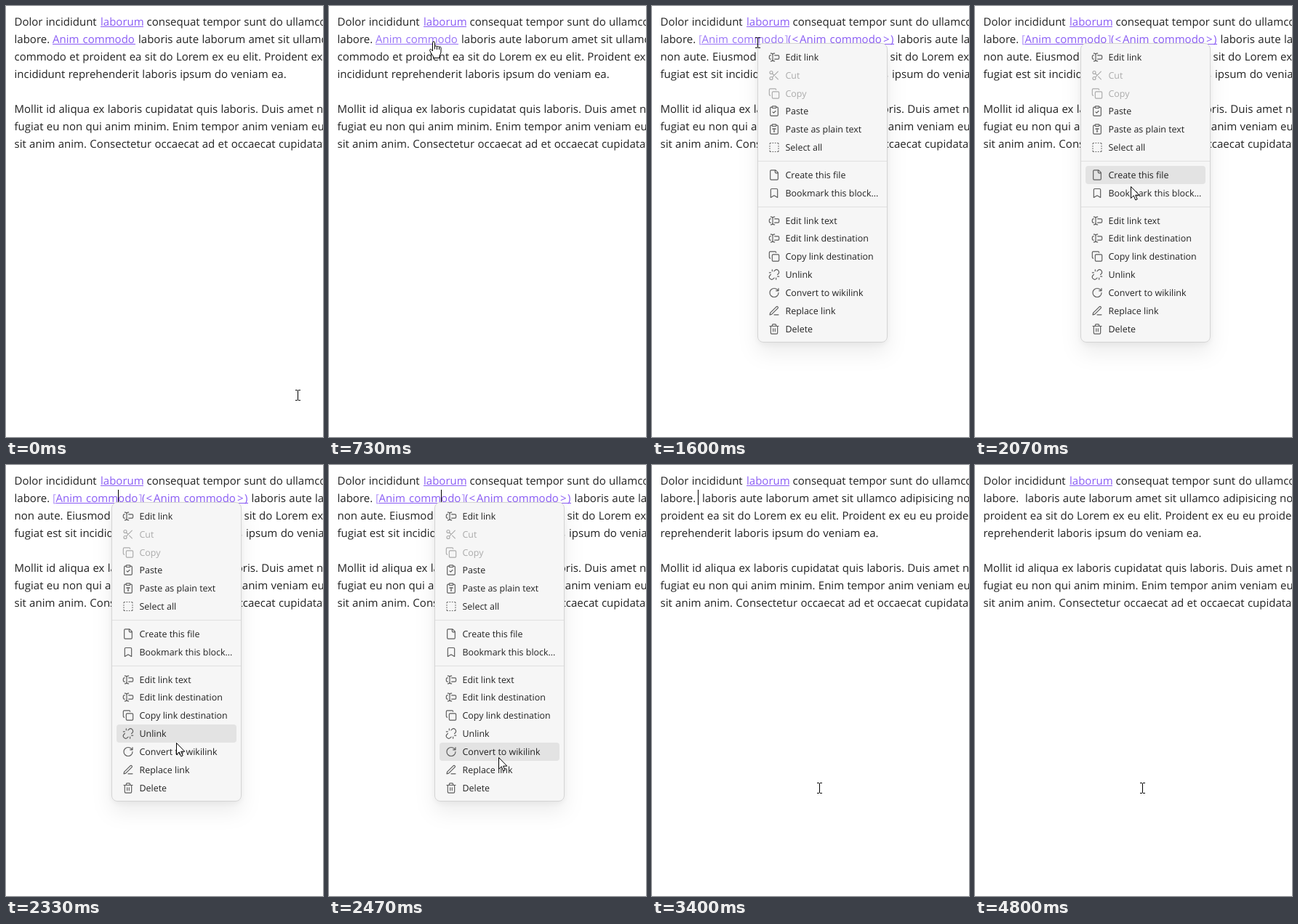
Recreate the animation shown at these times as an HTML page. Size 436x593 px, loop 5.14 s.

```html
<!DOCTYPE html>
<html lang="en">
<head>
<meta charset="utf-8">
<title>Link context menu</title>
<style>
  html, body { margin: 0; width: 100%; height: 100%; overflow: hidden; background: #fff; }
  svg { display: block; }
  text { font: 15px "Open Sans", "Noto Sans", sans-serif; word-spacing: .45px; fill: #222; white-space: pre; text-rendering: geometricPrecision; }
  .link, .link text { fill: #8a5cf5; }
  .link.hover, .link.hover text { fill: #9873f7; }
  text.mark { fill: #8a5cf5; opacity: .65; }
  #panel { fill: #f6f6f6; stroke: #d4d4d4; filter: drop-shadow(0 3px 4px rgba(0,0,0,.05)) drop-shadow(0 14px 14px rgba(0,0,0,.07)); }
  #menu text { font-size: 12.45px; word-spacing: 0; }
  #menu .off text { fill: #ababab; }
  .icon { fill: none; stroke: #5c5c5c; stroke-width: 1.75; stroke-linecap: round; stroke-linejoin: round; }
  .off .icon { stroke: #ababab; }
  .pointer { fill: #fff; stroke: #000; stroke-linejoin: round; }
</style>
</head>
<body>
<svg id="stage" width="436" height="593" viewBox="0 0 436 593">
  <g id="shared"></g>
  <g id="rendered"></g>
  <g id="expanded"></g>
  <g id="deleted"></g>
  <rect id="caret" y="34" width="1" height="21"/>
  <g id="menu">
    <rect id="panel" x="145.5" y="51.5" width="178" height="411" rx="7.5"/>
    <path d="M146 213.5h177M146 276.5h177" stroke="#e0e0e0"/>
    <rect id="highlight" x="152" width="165" height="25" rx="4" fill="#e3e3e3"/>
  </g>
  <path id="ibeam" fill="none" stroke="#000" d="M-3-6.5h3M1-6.5h3M.5-6V7M-3 7.5h3M1 7.5h3"/>
  <path id="arrow" class="pointer" d="M.5.5v16l3.7-3.6 2.6 6 2.4-1-2.6-5.7h5.2z"/>
  <path id="hand" class="pointer" d="M-2.5 12V.5a1.5 1.5 0 0 1 3 0V6c0-1.5 3-1.5 3 .3 0-1.5 3-1.2 3 .5 0-1.3 2.5-1 2.5.8V13c0 3-2 4-2 6.5v2h-8.5V20C-2 18-5 15-6 12c-1.3-2.5 1-3.5 2.3-1.5zM.5 5v4.5M3.5 6v4M6.5 7v3"/>
</svg>
<script>
const LOOP = 5140, STEP = 1000 / 15, LEFT = 11.5;
const $ = id => document.getElementById(id);

function add(parent, tag, attrs, content = '') {
  const node = document.createElementNS('http://www.w3.org/2000/svg', tag);
  for (const key in attrs) node.setAttribute(key, attrs[key]);
  node.textContent = content;
  return parent.appendChild(node);
}

// Text on a line of the 24px baseline grid
const write = (parent, line, x, content, cls = '') =>
  add(parent, 'text', { x, y: 27 + 24 * line, class: cls }, content);

function link(parent, line, x, width, pieces) {
  const group = add(parent, 'g', { class: 'link' });
  for (const [px, content] of pieces) write(group, line, px, content);
  add(group, 'rect', { x, y: 28 + 24 * line, width, height: 1 });
  return group;
}

const shared = $('shared');
write(shared, 0, LEFT, 'Dolor incididunt ');
link(shared, 0, 130, 59, [[130, 'laborum']]);
write(shared, 0, 193.5, 'consequat tempor sunt do ullamco');
write(shared, 1, LEFT, 'labore.');
write(shared, 5, LEFT, 'Mollit id aliqua ex laboris cupidatat quis laboris. Duis amet non');
write(shared, 6, LEFT, 'fugiat eu non qui anim minim. Enim tempor anim veniam eu');
write(shared, 7, LEFT, 'sit anim anim. Consectetur occaecat ad et occaecat cupidatat');

const rendered = $('rendered');
const plainLink = link(rendered, 1, 64, 114, [[64, 'Anim'], [105.5, 'commodo']]);
write(rendered, 1, 182, 'laboris aute laborum amet sit ullamco');
write(rendered, 2, LEFT, 'commodo et proident ea sit do Lorem ex eu elit. Proident ex');
write(rendered, 3, LEFT, 'incididunt reprehenderit laboris ipsum do veniam ea.');

const expanded = $('expanded');
write(expanded, 1, 64, '[', 'mark');
const sourceLink = link(expanded, 1, 68.5, 114, [[68.5, 'Anim'], [110, 'commodo']]);
write(expanded, 1, 182.5, ']', 'mark');
link(expanded, 1, 187, 146, [[187, '('], [192.5, '<'], [203, 'Anim'], [244.5, 'commodo'], [318, '>'], [328, ')']]);
write(expanded, 1, 337.5, 'laboris aute laborum');
write(expanded, 2, LEFT, 'non aute. Eiusmod commodo et proident ea');
write(expanded, 2, 327.5, 'sit do Lorem ex eu');
write(expanded, 3, LEFT, 'fugiat est sit incididunt reprehenderit laboris');
write(expanded, 3, 330, 'ipsum do veniam ea.');

const deleted = $('deleted');
write(deleted, 1, 69, 'laboris aute laborum amet sit ullamco adipisicing non');
write(deleted, 2, LEFT, 'proident ea sit do Lorem ex eu elit. Proident ex eu eu proident');
write(deleted, 3, LEFT, 'reprehenderit laboris ipsum do veniam ea.');

const clipboard = 'M9 2h6a1 1 0 0 1 1 1v2a1 1 0 0 1-1 1H9a1 1 0 0 1-1-1V3a1 1 0 0 1 1-1zM16 4h2a2 2 0 0 1 2 2v14a2 2 0 0 1-2 2H6a2 2 0 0 1-2-2V6a2 2 0 0 1 2-2h2';
const icons = {
  edit: 'M5 4h1a3 3 0 0 1 3 3 3 3 0 0 1 3-3h1M13 20h-1a3 3 0 0 1-3-3 3 3 0 0 1-3 3H5M5 16H4a2 2 0 0 1-2-2v-4a2 2 0 0 1 2-2h1M13 8h7a2 2 0 0 1 2 2v4a2 2 0 0 1-2 2h-7M9 7v10',
  cut: 'M9 6a3 3 0 1 1-6 0 3 3 0 0 1 6 0M9 18a3 3 0 1 1-6 0 3 3 0 0 1 6 0M20 4 8.12 15.88M14.47 14.48 20 20M8.12 8.12 12 12',
  copy: 'M10 8h10a2 2 0 0 1 2 2v10a2 2 0 0 1-2 2H10a2 2 0 0 1-2-2V10a2 2 0 0 1 2-2zM4 16a2 2 0 0 1-2-2V4a2 2 0 0 1 2-2h10a2 2 0 0 1 2 2',
  paste: clipboard + 'M9 14l2 2 4-4',
  plain: clipboard + 'M9 12v-1h6v1M11 17h2M12 11v6',
  select: 'M5 3a2 2 0 0 0-2 2M19 3a2 2 0 0 1 2 2M21 19a2 2 0 0 1-2 2M5 21a2 2 0 0 1-2-2M9 3h1M9 21h1M14 3h1M14 21h1M3 9v1M21 9v1M3 14v1M21 14v1',
  file: 'M15 2H6a2 2 0 0 0-2 2v16a2 2 0 0 0 2 2h12a2 2 0 0 0 2-2V7zM14 2v4a2 2 0 0 0 2 2h4',
  bookmark: 'M19 21l-7-4-7 4V5a2 2 0 0 1 2-2h10a2 2 0 0 1 2 2z',
  unlink: 'M18.84 12.25l1.72-1.71a5 5 0 0 0-.14-7.07 5 5 0 0 0-6.95 0l-1.72 1.71M5.17 11.75l-1.71 1.71a5 5 0 0 0 .12 7.07 5 5 0 0 0 6.95 0l1.71-1.71M8 2v3M2 8h3M16 19v3M19 16h3',
  rotate: 'M21 12a9 9 0 1 1-9-9c2.52 0 4.93 1 6.74 2.74L21 8M21 3v5h-5',
  pencil: 'M12 20h9M16.5 3.5a2.12 2.12 0 0 1 3 3L7 19l-4 1 1-4z',
  trash: 'M3 6h18M19 6v14a2 2 0 0 1-2 2H7a2 2 0 0 1-2-2V6M8 6V4a2 2 0 0 1 2-2h4a2 2 0 0 1 2 2v2M10 11v6M14 11v6'
};
const items = [
  ['edit', 'Edit link'], ['cut', 'Cut', 'off'], ['copy', 'Copy', 'off'], ['paste', 'Paste'],
  ['plain', 'Paste as plain text'], ['select', 'Select all'],
  ['file', 'Create this file'], ['bookmark', 'Bookmark this block...'],
  ['edit', 'Edit link text'], ['edit', 'Edit link destination'], ['copy', 'Copy link destination'],
  ['unlink', 'Unlink'], ['rotate', 'Convert to wikilink'], ['pencil', 'Replace link'], ['trash', 'Delete']
];
const rowCentre = i => Math.round(70 + 24.83 * i + (i > 5 ? 13 : 0) + (i > 7 ? 13 : 0)) + .5;

items.forEach(([icon, label, cls = ''], i) => {
  const y = rowCentre(i), row = add($('menu'), 'g', { class: cls });
  add(row, 'path', { class: 'icon', d: icons[icon], transform: `translate(160 ${y - 8}) scale(.6667)` });
  add(row, 'text', { x: 183.5, y: y + 4.5 }, label);
});

// Pointer path: step, x, y
const path = [
  [0, 401, 535], [1, 392, 515], [3, 310, 360], [5, 220, 190], [7, 158, 86], [8, 146, 66], [11, 145, 50],
  [25, 145, 50], [28, 178, 150], [30, 206, 228], [31, 214, 248], [34, 230, 362], [35, 234, 382],
  [39, 232, 422], [42, 230, 440], [43, 230, 443], [51, 230, 444], [99, 230, 444]
];
function pointerAt(step) {
  const i = path.findIndex(p => p[0] > step);
  const [s0, x0, y0] = path[i - 1], [s1, x1, y1] = path[i];
  const f = (step - s0) / (s1 - s0);
  return [Math.round(x0 + (x1 - x0) * f), Math.floor(y0 + (y1 - y0) * f)];
}

const show = (id, on) => $(id).setAttribute('visibility', on ? 'visible' : 'hidden');

function draw(t) {
  const step = Math.floor((t + 4) / STEP);
  const opened = step >= 15, removed = step >= 51, menuOpen = step >= 18 && !removed;
  show('rendered', !opened);
  show('expanded', opened && !removed);
  show('deleted', removed);
  show('menu', menuOpen);
  plainLink.classList.toggle('hover', step >= 9);
  sourceLink.classList.toggle('hover', step < 26);

  const blink = Math.floor((t - 1066) / 533.4);
  show('caret', opened && (blink < 0 || blink % 2 === 0));
  $('caret').setAttribute('x', removed ? 63 : 154);

  // The highlight trails the pointer by one step
  const trail = pointerAt(Math.max(0, step - 1))[1];
  const hovered = items.findIndex((item, i) => !item[2] && Math.abs(trail - rowCentre(i)) <= 12.5);
  show('highlight', menuOpen && step > 26 && hovered >= 0);
  if (hovered >= 0) $('highlight').setAttribute('y', rowCentre(hovered) - 12.5);

  const [x, y] = pointerAt(step);
  const shape = step >= 9 && step < 16 ? 'hand' : step >= 26 && !removed ? 'arrow' : 'ibeam';
  for (const id of ['ibeam', 'arrow', 'hand']) show(id, id === shape);
  $(shape).setAttribute('transform', `translate(${x} ${y})`);
}

const start = performance.now();
function tick() {
  draw((performance.now() - start) % LOOP);
  requestAnimationFrame(tick);
}
draw(0);
requestAnimationFrame(tick);
</script>
</body>
</html>
```
